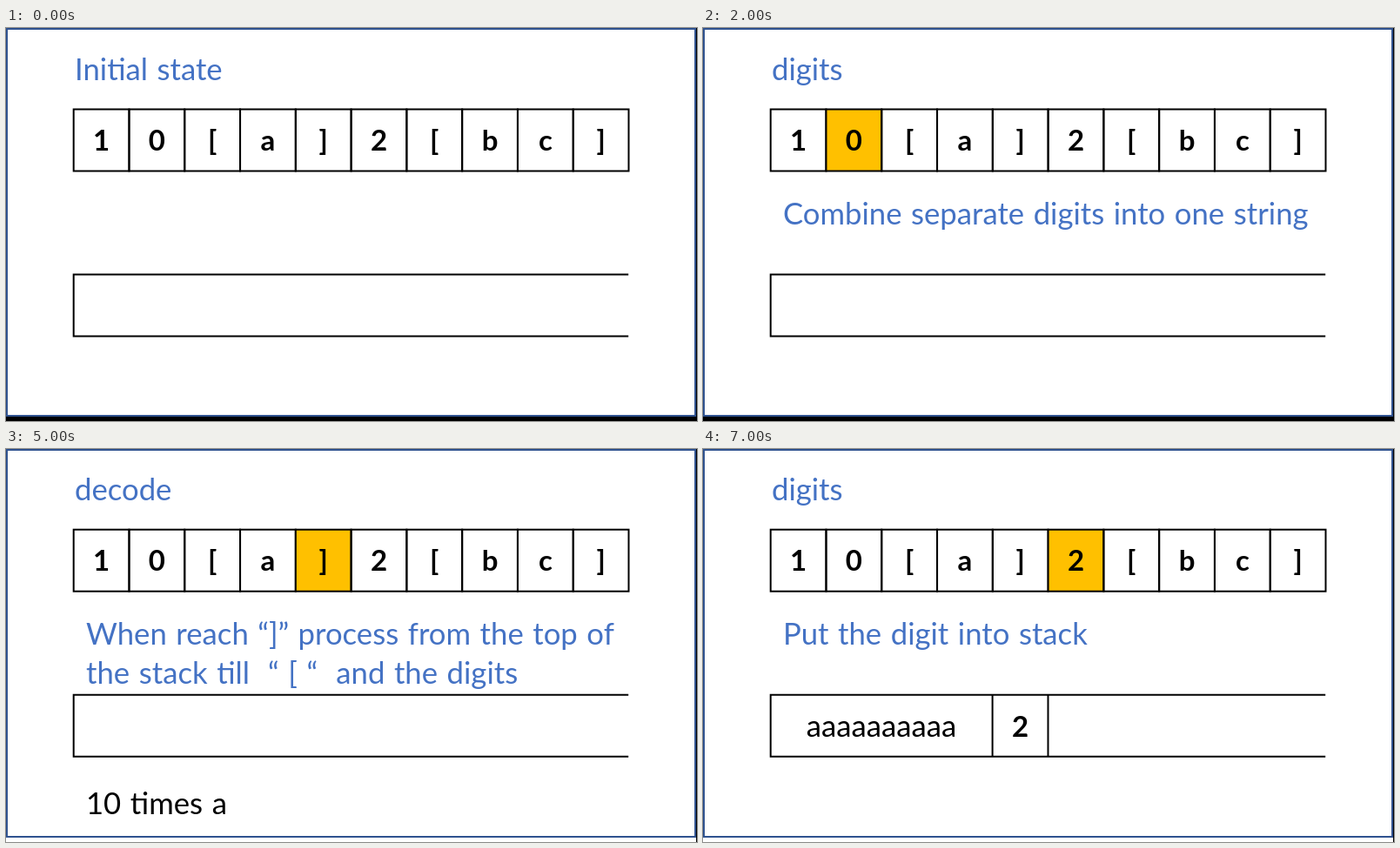
Recreate the animation shown at these times as an HTML page. Size 794 by 452 pixels, loop 8 s.

```html
<!DOCTYPE html>
<html lang="en">
<head>
<meta charset="utf-8">
<title>Decode string with a stack</title>
<style>
html, body { margin: 0; width: 100%; height: 100%; overflow: hidden; background: #fff; }
svg { display: block; }
text { font: 34.7px Lato, "Open Sans", sans-serif; word-spacing: 1.7px; white-space: pre; }
.blue { fill: #4472c4; }
.bold { font-size: 33px; font-weight: 700; }
.mid { text-anchor: middle; }
.line { fill: none; stroke: #000; stroke-width: 2; }
</style>
</head>
<body>
<svg id="stage" width="794" height="452" viewBox="0 0 794 452"></svg>
<script>
const NS = "http://www.w3.org/2000/svg";
const stage = document.getElementById("stage");
const STEP = 1000, LEFT = 77.7, CELL = 63.78, RIGHT = 715.2, HEIGHT = 71;
const chars = [..."10[a]2[bc]"];

function add(parent, tag, attrs, text = "") {
  const el = document.createElementNS(NS, tag);
  for (const key in attrs) el.setAttribute(key, attrs[key]);
  el.textContent = text;
  parent.appendChild(el);
  return el;
}

const combine = ["Combine separate digits into one string"];
const push = ["Put processed digits and letter into stack"];
const unwind = ["When reach “]” process from the top of", "the stack till  “ [ “  and the digits"];

// Stack items are [text, right edge, text centre].
const ten = ["10", 161, 120];
const run = ["aaaaaaaaaa", 332.6, 205];
const steps = [
  { title: "Initial state", at: -1, shift: 0.8 },
  { title: "digits", at: 0, note: combine, shift: 0.8 },
  { title: "digits", at: 1, note: combine, shift: 0.8 },
  { title: "letter", at: 2, note: push, stack: [ten, ["[", 205.3, 183]] },
  { title: "letter", at: 3, note: push, stack: [ten, ["[", 213, 187], ["a", 269, 241]], shift: 0.5 },
  { title: "decode", at: 4, note: unwind, result: "10 times a", open: true },
  { title: "decode", at: 4, note: unwind, stack: [run], open: true },
  { title: "digits", at: 5, note: ["Put the digit into stack"], stack: [run, ["2", 396.5, 364.5]], open: true }
];

function build(step) {
  const { title, at, note = [], stack = [], result, shift = 0, open } = step;
  const g = add(stage, "g", { visibility: "hidden" });
  add(g, "rect", { width: 794, height: 452, fill: "#fff" });
  add(g, "rect", { x: 793, width: 1, height: 452 });
  if (!open) add(g, "rect", { y: 447, width: 794, height: 5 });
  add(g, "rect", { x: 1, y: 1, width: 791, height: 445, fill: "none", stroke: "#2f528f", "stroke-width": 2 });

  const body = add(g, "g", { transform: `translate(0 ${shift})` });
  add(body, "text", { x: 79, y: 59.3, class: "blue" }, title);
  note.forEach((s, i) => add(body, "text", { x: 92, y: 225.3 + i * 45, class: "blue" }, s));

  const top = 92.7, low = 282.7;
  chars.forEach((c, i) => {
    const x = LEFT + i * CELL;
    add(body, "rect", { x, y: top, width: CELL, height: HEIGHT, class: "line",
      style: i === at ? "fill:#ffc000" : "" });
    add(body, "text", { x: x + CELL / 2, y: 140.3, class: "bold mid" }, c);
  });

  add(body, "path", { d: `M${RIGHT} ${low}H${LEFT}v${HEIGHT}H${RIGHT}`, class: "line" });
  for (const [s, edge, mid] of stack) {
    add(body, "path", { d: `M${edge} ${low}v${HEIGHT}`, class: "line" });
    add(body, "text", { x: mid, y: 331, class: s === run[0] ? "mid" : "bold mid" }, s);
  }
  if (result) add(body, "text", { x: 92, y: 419.5 }, result);
  return g;
}

const scenes = steps.map(build);
const start = performance.now();

function draw(now) {
  const k = Math.floor(Math.max(0, now - start) / STEP) % scenes.length;
  scenes.forEach((g, i) => g.setAttribute("visibility", i === k ? "visible" : "hidden"));
  requestAnimationFrame(draw);
}
draw(start);
</script>
</body>
</html>
```
